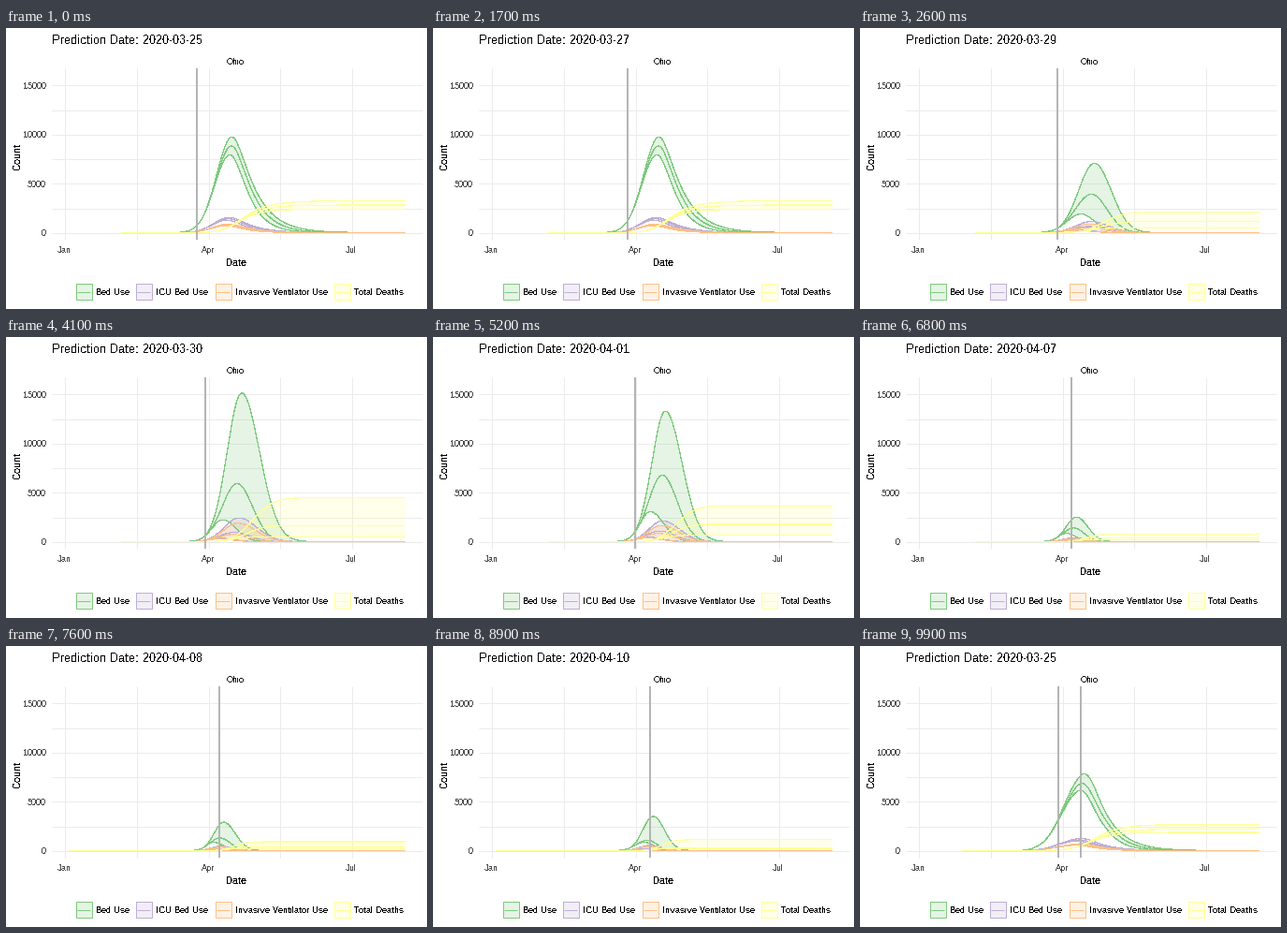
Write a matplotlib script that moves like this. It is 450 px wide and 300 px high and loops after 10000 ms.

```python
import numpy as np
import matplotlib
import matplotlib.pyplot as plt
from matplotlib.animation import FuncAnimation
from matplotlib.colors import to_rgba

matplotlib.rcParams.update({
    "font.family": "Liberation Sans",
    "text.hinting": "default",
    "text.hinting_factor": 1,
    "text.antialiased": False,
})

W, H = 450, 300
LEFT, RIGHT, TOP, BOTTOM = 49, 445, 43, 226
X0, DAY = 62.55, 153.5 / 91        # pixel of 1 January, pixels per day
Y0, UNIT = 218.5, 0.01052          # pixel of zero, pixels per count
KNOWN_X = X0 + 88 * DAY            # where all curves of a prediction meet
DEATH_LAG = 6 * DAY
SERIES = [("Bed Use", "#7FC97F", 74), ("ICU Bed Use", "#BEAED4", 138),
          ("Invasive Ventilator Use", "#FDC086", 223),
          ("Total Deaths", "#FFFF99", 350)]


def bed_curve(x, peak, height, mean, known, fall, tail):
    """One bump; taller than the mean peaks later and falls more slowly."""
    ratio = height / mean
    centre = peak + np.log(ratio) * (5 if ratio > 1 else 16)
    left = (centre - KNOWN_X) / np.sqrt(2 * np.log(height / known))
    right = fall * ratio ** .15
    tail = tail / ratio ** 3
    d = x - centre
    rise = -.5 * (d / left) ** 2
    drop = -tail * (np.sqrt(1 + (d / right) ** 2 / tail) - 1)
    return height * np.exp(np.where(d < 0, rise, drop))


def predict(peak, low, mean, high, fall, known=450, tail=1000,
            vent=.125, rate=.0068):
    """Low, mean and high curves of all four series, as a function of x."""
    def beds(x):
        rows = [bed_curve(x, peak, h, mean, known, fall, tail)
                for h in (low, mean, high)]
        return np.maximum.accumulate(rows)

    def curves(x):
        deaths = np.cumsum(beds(x - DEATH_LAG) * np.gradient(x), axis=1)
        return np.array([beds(x), .16 * beds(x + 3), vent * beds(x + 4),
                         rate * deaths])
    return curves


first = predict(241, 7900, 8800, 9700, 15, known=1700, tail=.75, vent=.09)
late = dict(known=300, rate=.011)
calm = predict(228.5, 850, 1400, 2500, 11, rate=.0105)
STATES = [
    ("03-25", first), ("03-26", first), ("03-27", first),
    ("03-29", predict(247.5, 1900, 3900, 7050, 16.5)),
    ("03-30", predict(247.5, 1980, 5620, 15850, 16.5)),
    ("03-31", predict(246, 3000, 6750, 13000, 16)),
    ("04-01", predict(245, 3050, 6750, 13250, 16)),
    ("04-05", calm), ("04-07", calm),
    ("04-08", predict(228.5, 850, 1300, 2900, 11, **late)),
    ("04-10", predict(228.5, 850, 1080, 3650, 10, **late)),
    ("04-13", predict(233, 950, 1050, 3100, 9, **late)),
]
COUNT = len(STATES)
STARTS = np.array([5 + 8 * n + min(n, 4) for n in range(COUNT)])


def day_of(date):
    month, day = map(int, date.split("-"))
    return 31 + 29 + 31 * (month - 3) + day - 1


DAYS = [day_of(date) for date, _ in STATES]

# Later predictions begin in January, earlier ones in February.
LONG = X0 + DAY * np.arange(3, 217)
SHORT = np.interp(LONG, [LONG[0], 145, 225, 262, LONG[-1]],
                  [X0 + 36 * DAY, 200, 241, 265, LONG[-1]])
XS = [SHORT if n < 9 else LONG for n in range(COUNT)]
YS = [Y0 - UNIT * curves(x) for x, (_, curves) in zip(XS, STATES)]

fig = plt.figure(figsize=(W / 72, H / 72), dpi=72, facecolor="white")
ax = fig.add_axes([0, 0, 1, 1])
ax.set(xlim=(0, W), ylim=(H, 0))
ax.axis("off")


def label(x, y, text, size=9, color="black", ha="left", rotation=0):
    return ax.text(x, y, text, fontsize=size, color=color, ha=ha,
                   va="baseline", rotation=rotation, rotation_mode="anchor")


def rule(xs, ys, color, width=1, z=3):
    return ax.plot(xs, ys, color=color, lw=width, solid_capstyle="butt",
                   snap=True, zorder=z)[0]


def hairline(color):
    # Without antialiasing every touched pixel is filled, so this is 1 px.
    return ax.plot([], [], color=color, lw=.15, antialiased=False, zorder=3)[0]


def area(color):
    return ax.fill([0, 1, 1], [0, 0, 1], facecolor=to_rgba(color, .2),
                   lw=0, antialiased=False, zorder=2)[0]


# Grid, axes and titles
for n in range(5):
    x = int(X0 + n * 153.5 / 2) + .5
    rule([x, x], [TOP, BOTTOM], "#EBEBEB", z=1)
for n in range(7):
    y = Y0 - n * 2500 * UNIT
    rule([LEFT, RIGHT], [int(y) + .5] * 2, "#EBEBEB", z=1)
    if n % 2 == 0:
        label(43, round(y) + 4, str(n * 2500), color="#4D4D4D", ha="right")
for n, month in enumerate(["Jan", "Apr", "Jul"]):
    label(62 + n * 153.5, 240, month, color="#4D4D4D", ha="center")
label(245.5, 39, "Ohio", color="#1A1A1A", ha="center")
label(246.5, 254, "Date", 11, ha="center")
label(15, 137, "Count", 11, ha="center", rotation=90)
title = label(49, 17, "", 13)

# Legend
for name, color, x in SERIES:
    l, r, t, b = x + .5, x + 17.5, 272.5, 289.5
    area(color).set_xy([(l, t), (r, t), (r, b), (l, b)])
    rule([l, r, r, l, l], [t, t, b, b, t], color)
    rule([l + 1.5, r - 1.5], [281.5, 281.5], color)
    label(x + 22, 285, name)

ribbons = [area(color) for _, color, _ in SERIES]
lines = [[hairline(color) for _ in range(3)] for _, color, _ in SERIES]
marker, leaving = (rule([], [], "#B4B4B4", 2, 4) for _ in range(2))


def place(line, day):
    x = round(X0 + DAY * day)
    line.set_data([x, x], [TOP, BOTTOM])


def draw(i):
    pos = np.clip((i - STARTS + 1) / 4, 0, 1).sum()
    a = int(pos)
    b = (a + 1) % COUNT
    t = pos - a

    def mix(values):
        return (1 - t) * values[a] + t * values[b]

    x = mix(XS)
    for ribbon, trio, ys in zip(ribbons, lines, mix(YS)):
        ribbon.set_xy(np.column_stack([np.r_[x, x[::-1]],
                                       np.r_[ys[2], ys[0][::-1]]]))
        for line, y in zip(trio, ys):
            line.set_data(x, y)

    place(marker, mix(DAYS))
    # The last marker lingers while the loop returns to the first date.
    place(leaving, DAYS[-1])
    leaving.set_visible(b == 0 and t > 0)
    title.set_text("Prediction Date: 2020-" + STATES[a if t < .75 else b][0])
    return [*ribbons, *sum(lines, []), marker, leaving, title]


anim = FuncAnimation(fig, draw, frames=100, interval=100, repeat=True)
plt.show()
```
